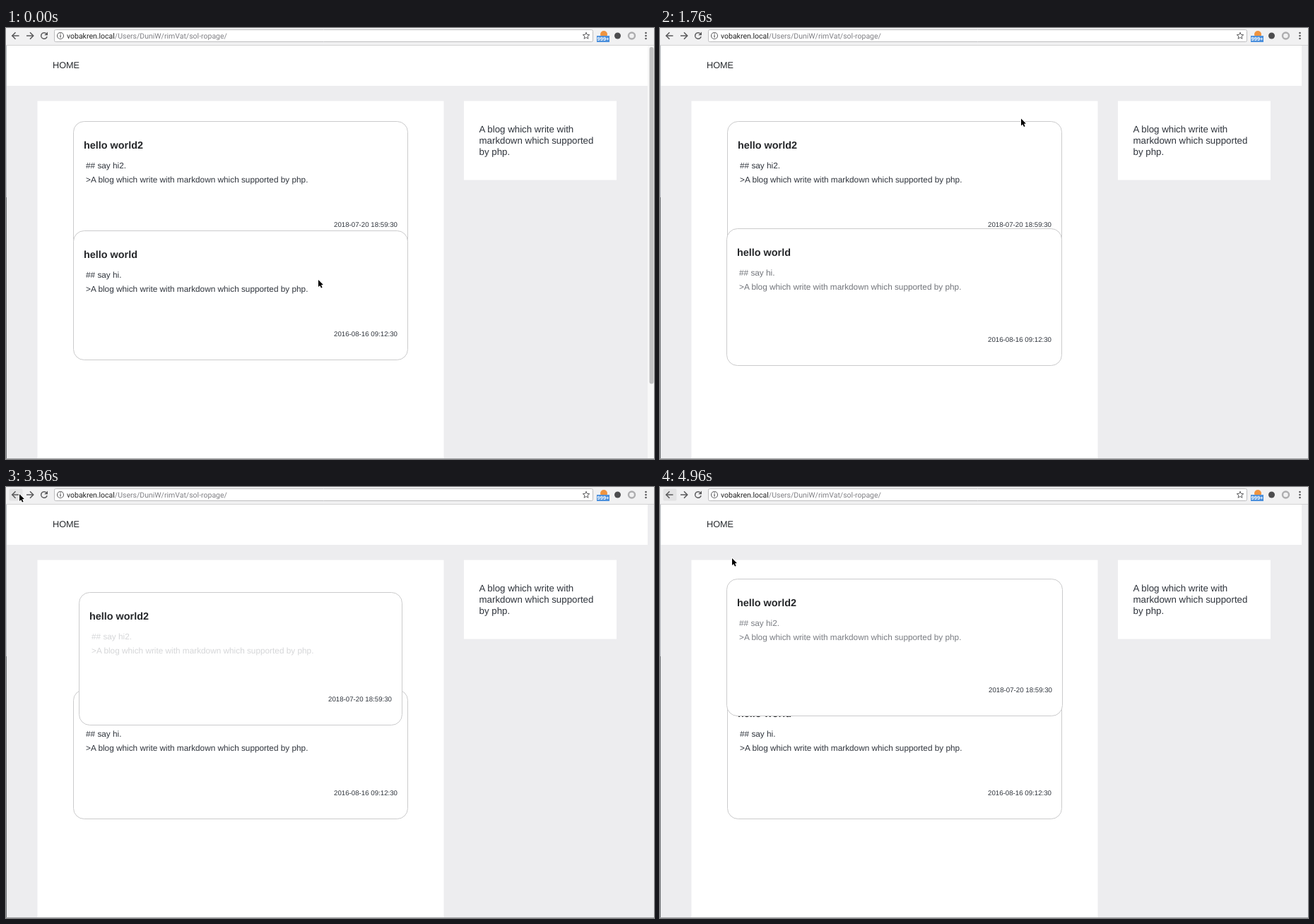
An HTML page with a canvas for the animation above (5.12 s loop, 917 by 611 pixels).

```html
<!DOCTYPE html>
<html lang="en">
<head>
<meta charset="utf-8">
<style>
html, body { margin: 0; width: 100%; height: 100%; overflow: hidden; background: #ededef; }
canvas { display: block; }
</style>
</head>
<body>
<canvas id="stage" width="917" height="611"></canvas>
<script>
const c = document.getElementById('stage').getContext('2d');
c.textRendering = 'geometricPrecision';
const LOOP = 5120, STEP = 160;
const SANS = '"Liberation Sans", Arial, sans-serif', UI = 'Roboto, sans-serif';
const HOST = 'vobakren.local', DIR = '/Users/DuniW/rimVat/sol-ropage/';
const BLURB = 'A blog which write with markdown which supported by php.';
const INK = '#2f343c';

const cards = [
  { y: 132, title: 'hello world2', say: 'say hi2.', date: '2018-07-20 18:59:30' },
  { y: 287, title: 'hello world', say: 'say hi.', date: '2016-08-16 09:12:30' }
];
// [time, card, opens]
const clicks = [[200, 1, 1], [1350, 1, 0], [2240, 0, 1], [3240, 0, 0], [4115, 0, 1], [4573, 0, 0]];
// [time, x, y] of the pointer tip
const path = [
  [0, 442, 357], [320, 442, 357], [1120, 605, 60], [1280, 601, 41], [1440, 601, 41],
  [2080, 421, 216], [2400, 421, 216], [2880, 45, 20], [3200, 17, 8], [3360, 19, 10],
  [3680, 19, 10], [4000, 33, 12], [4160, 30.5, 17], [4480, 16, 9], [4640, 16, 9], [4960, 102, 101]
];

function rect(x, y, w, h, fill) {
  c.fillStyle = fill;
  c.fillRect(x, y, w, h);
}

function box(x, y, w, h, r, fill, stroke) {
  c.beginPath();
  c.roundRect(x + .5, y + .5, w - 1, h - 1, r);
  c.fillStyle = fill;
  c.fill();
  if (stroke) line(stroke, 1);
}

function line(color, width) {
  c.strokeStyle = color;
  c.lineWidth = width;
  c.stroke();
}

function poly(points, close) {
  c.beginPath();
  points.forEach(([x, y]) => c.lineTo(x, y));
  if (close) c.closePath();
}

function circle(x, y, r, fill) {
  c.beginPath();
  c.arc(x, y, r, 0, 7);
  if (fill) {
    c.fillStyle = fill;
    c.fill();
  }
}

function text(s, x, y, size, color = INK, align = 'left', weight = '', family = SANS) {
  c.font = `${weight} ${size}px ${family}`;
  c.textAlign = align;
  c.fillStyle = color;
  c.fillText(s, x, y);
  return c.measureText(s).width;
}

function drawArrow(x, dir, color) {
  poly([[x - 5 * dir, 11], [x + 5 * dir, 11]]);
  line(color, 1.5);
  poly([[x, 6.3], [x - 4.7 * dir, 11], [x, 15.7]]);
  line(color, 1.5);
}

function drawToolbar(file, canForward, backHover) {
  rect(0, 0, 917, 24, '#f1f1f2');
  rect(0, 24, 917, 1, '#d3d3d4');
  if (backHover) box(4, 2, 20, 18, 2, '#e3e3e4');
  drawArrow(13.5, 1, '#58585a');
  drawArrow(34, -1, canForward ? '#58585a' : '#cfcfd0');

  c.beginPath();
  c.arc(54, 11, 4.3, .3, 5.4);
  line('#58585a', 1.5);
  poly([[59, 5.5], [59, 10.3], [54.2, 10.3]], true);
  c.fillStyle = '#58585a';
  c.fill();

  box(68, 2, 763, 18, 2, '#fff', '#bdbdbf');
  circle(77, 11, 4.5);
  line('#606062', 1.1);
  rect(76.4, 10, 1.3, 3.6, '#606062');
  rect(76.4, 7.8, 1.3, 1.3, '#606062');
  const w = text(HOST, 86, 14.5, 10.5, '#222', 'left', '', UI);
  text(DIR + file, 86 + w, 14.5, 10.5, '#808085', 'left', '', UI);

  poly([...Array(10)].map((_, i) => {
    const r = i % 2 ? 2.2 : 5, a = i * Math.PI / 5;
    return [821 + r * Math.sin(a), 11.2 - r * Math.cos(a)];
  }), true);
  line('#606062', 1);

  circle(846, 9, 5, '#ef9440');
  rect(836, 11, 18, 9, '#4a8fdc');
  text('999+', 845, 18.3, 7.5, '#fff', 'center', 'bold');
  circle(865.5, 11, 4.5, '#4c4c4e');
  circle(885.5, 11, 4.5);
  line('#adadaf', 2.4);
  for (const y of [7, 11, 15]) circle(905.5, y, 1.3, '#58585a');
}

function drawPage() {
  rect(0, 0, 917, 611, '#ededef');
  rect(0, 25, 908, 57, '#fff');
  text('HOME', 66, 57.3, 12.7, '#25282c');
  rect(44.5, 103.5, 575, 508, '#fff');
  rect(648, 103.5, 216, 112, '#fff');
  ['A blog which write with', 'markdown which supported', 'by php.']
    .forEach((s, i) => text(s, 669.5, 148 + 16 * i, 13.3));
}

function drawCard(card, { x, y, w, h, open, fade }) {
  box(x, y, w, h, 15, '#fff', '#cbcbcc');
  text(card.date, x + w - 15, y + h - 34, 9.7, INK, 'right');
  if (open) {
    text(card.title, x + w / 2, y + 38.3, 14.4, '#25272a', 'center', 'bold');
    text('X', x + w - 19, y + 23.3, 13.3, INK, 'center');
  } else {
    text(card.title, x + 15, y + 39, 14.4, '#25272a', 'left', 'bold');
  }
  c.globalAlpha = fade;
  if (open) {
    text(card.say, x + 46, y + 80, 16.9, '#000', 'left', 'bold');
    rect(x + 29, Math.round(y + 84), w - 58, 1, '#c9c9ca');
    text(BLURB, x + 46, y + 110, 11.8);
  } else {
    text('## ' + card.say, x + 18, y + 67, 11.8);
    text('>' + BLURB, x + 18, y + 86.5, 11.8);
  }
  c.globalAlpha = 1;
}

function restPose(card) {
  return { x: 95, y: card.y, w: 474, h: 184, open: 0, fade: 1 };
}

// Position follows a damped spring; the height has its own course.
function movingPose(card, open, age) {
  const swing = Math.exp(-.0095 * age) * Math.cos(Math.PI * age / 180);
  const p = open ? 1 - swing : swing;
  let h;
  if (open) h = age < 700 ? 184 + 545 * (1 - Math.exp(-age / 32)) : 585;
  else h = 194 + (p < 0 ? 30 * p : 391 * p ** 1.5);
  return {
    x: Math.round(95 - 50 * p), y: Math.round(card.y - (card.y - 25) * p),
    w: Math.round(474 + 100 * p), h: Math.round(h),
    open, fade: Math.min(1, age / (open ? 350 : 600))
  };
}

function drawScrollbar(pageHeight) {
  if (pageHeight <= 587) return;
  rect(908, 25, 9, 586, '#f8f8f8');
  box(910, 26.5, 7, 587 * 587 / pageHeight, 3, '#c1c1c2');
}

function pointerAt(t) {
  const i = path.findIndex(k => k[0] > t);
  if (i < 0) return path[path.length - 1].slice(1);
  const [a, b] = [path[i - 1], path[i]];
  const u = (t - a[0]) / (b[0] - a[0]), e = u * u * (3 - 2 * u);
  return [a[1] + (b[1] - a[1]) * e, a[2] + (b[2] - a[2]) * e];
}

function drawPointer(t) {
  const [x, y] = pointerAt(t);
  c.save();
  c.translate(x, y);
  c.lineJoin = 'round';
  if (t >= 1120 && t <= 1440) {
    poly([[-1, 0], [1, 0], [1.4, 4], [4, 4.2], [5.5, 5.5], [5.3, 8.5], [4, 12], [-1, 12],
      [-4, 7.5], [-3.4, 6.2], [-1, 7.5]], true);
    c.fillStyle = '#fff';
    c.fill();
    line('#111', 1.2);
  } else if (t >= 2080 && t <= 2400) {
    poly([[-2.5, -5.5], [0, -4.5], [2.5, -5.5]]);
    line('#111', 1);
    poly([[0, -4.5], [0, 4.5]]);
    line('#111', 1.2);
    poly([[-2.5, 5.5], [0, 4.5], [2.5, 5.5]]);
    line('#111', 1);
    poly([[-1.5, 1.5], [1.5, 1.5]]);
    line('#111', 1);
  } else {
    poly([[0, 0], [0, 10], [2.2, 8], [4, 11.6], [5.6, 10.9], [4, 7.3], [6.9, 7.1]], true);
    line('#fff', 2);
    c.fillStyle = '#000';
    c.fill();
  }
  c.restore();
}

function draw(t) {
  const [at, index, open] = clicks.filter(k => k[0] <= t).pop() || [-LOOP, 0, 0];
  const age = t - at, active = cards[index];
  const moving = age > 0 && (open || age < 600);
  const file = open ? active.date.replace(/\D/g, '') + '.html' : '';

  drawPage();
  for (const card of cards) {
    if (!moving || card !== active) drawCard(card, restPose(card));
  }
  let pageHeight = 720;
  if (moving) {
    const pose = movingPose(active, open, age);
    drawCard(active, pose);
    pageHeight = open ? pose.y + pose.h - 24 : 0;
  }
  drawScrollbar(pageHeight);

  if (t >= 2720 && t <= 2880) {
    c.globalAlpha = t < 2880 ? .6 : .22;
    box(-3, 598, 310, 16, 2, '#f4f4f5', '#c4c4c6');
    text(HOST + DIR + file, 4, 607, 8.4, '#666', 'left', '', UI);
    c.globalAlpha = 1;
  }

  drawToolbar(file, !open, (t >= 3040 && t < 3840) || t >= 4480);
  rect(0, 25, 1, 215, '#b4b8bd');
  rect(0, 240, 1, 371, '#707275');
  rect(0, 610, 917, 1, '#a2a3a5');
  drawPointer(t);
}

const start = performance.now();
function tick() {
  const t = (performance.now() - start) % LOOP;
  draw(Math.floor(t / STEP) * STEP);
  requestAnimationFrame(tick);
}
tick();
</script>
</body>
</html>
```
